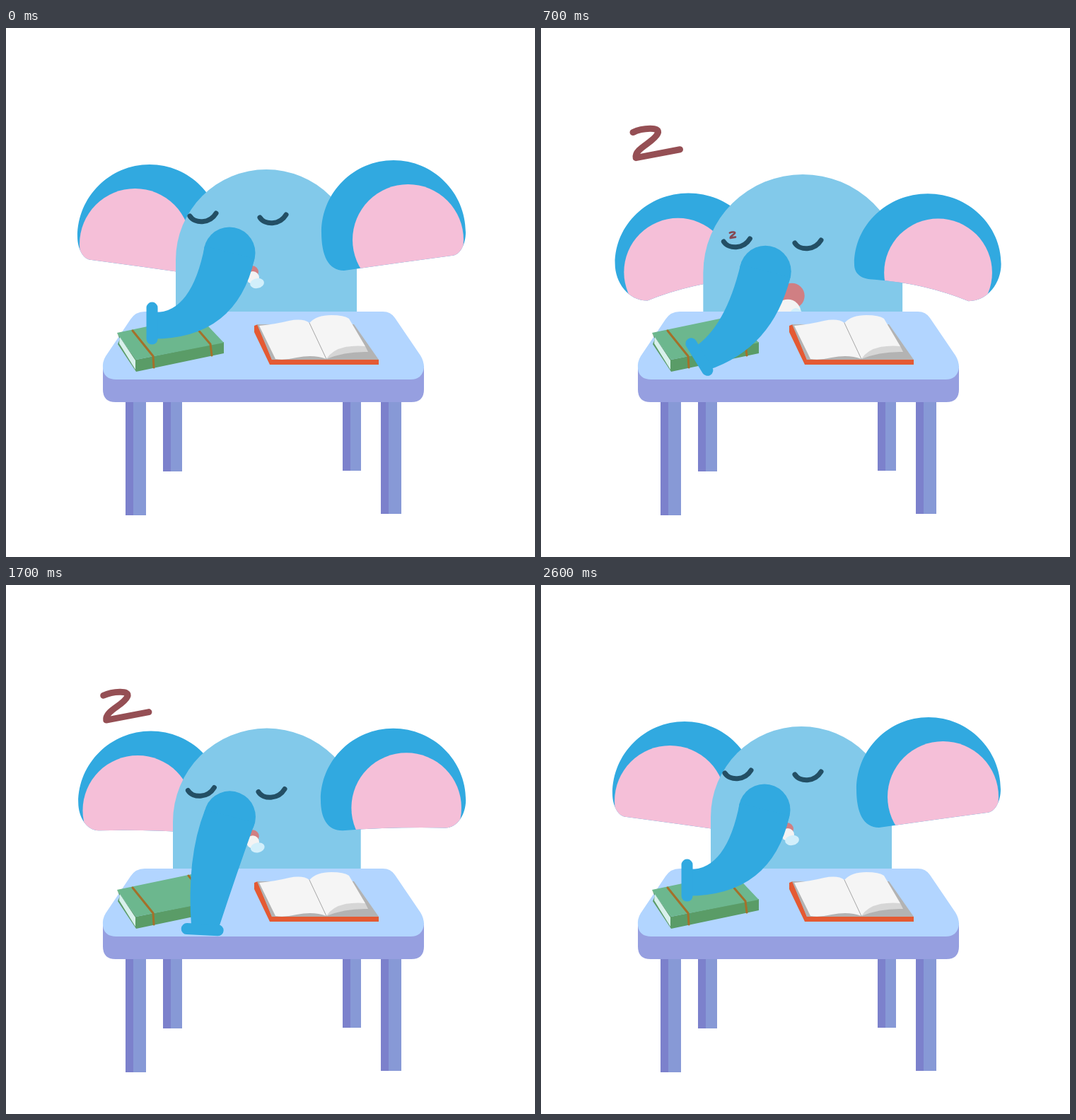
These frames come from a looping animation (748 by 748 pixels, 3 s). An HTML page with a canvas:

```html
<!DOCTYPE html>
<html lang="en">
<head>
<meta charset="utf-8">
<title>Sleepy elephant</title>
<style>
html, body { margin: 0; width: 100%; height: 100%; overflow: hidden; background: #fff; }
canvas { display: block; width: 748px; height: 748px; }
</style>
</head>
<body>
<canvas id="stage" width="748" height="748"></canvas>
<script>
const ctx = document.getElementById('stage').getContext('2d');
const LOOP = 3000, STEP = 50;
const NOD = 1450, ASLEEP = 500, AWAKE = 1050;
const Z_GAP = 1067, Z_BORN = -420, Z_HALT = 33, Z_LEAVE = 500, Z_GONE = 720;
const BLUE = '#31a9e0', SKY = '#82c9ea', PINK = '#f5bfd8';

const mix = (a, b, u) => a + (b - a) * u;
const ramp = (t, a, b) => Math.min(1, Math.max(0, (t - a) / (b - a)));
const hump = (t, a, b) => Math.sin(Math.PI * ramp(t, a, b));

// Goes 0 -> 1 -> 0 over one nod; higher powers leave the upright pose later or return sooner.
function nodding(t, sinkPower, risePower) {
  const u = t < ASLEEP ? ramp(t, 0, ASLEEP) : ramp(t, AWAKE, ASLEEP);
  return (u * u * (3 - 2 * u)) ** (t < ASLEEP ? sinkPower : risePower);
}

function fill(color, d) {
  ctx.fillStyle = color;
  ctx.fill(typeof d === 'string' ? new Path2D(d) : d);
}

function line(color, width, d) {
  ctx.strokeStyle = color;
  ctx.lineWidth = width;
  ctx.stroke(new Path2D(d));
}

function oval(color, x, y, rx, ry = rx, turn = 0) {
  ctx.fillStyle = color;
  ctx.beginPath();
  ctx.ellipse(x, y, rx, ry, turn, 0, Math.PI * 2);
  ctx.fill();
}

function box(color, x, y, w, h) {
  ctx.fillStyle = color;
  ctx.fillRect(x, y, w, h);
}

// Both ears share one shape around their centre, with x pointing outwards.
function drawEar(x, y, out, droop) {
  const rx = 102 + 3 * droop, ry = 102 - 4 * droop, k = 0.552;
  const ex = mix(-70, -78, droop), ey = mix(54, 1, droop);
  const tipX = mix(82, 42, droop), tipY = mix(33, 65, droop);
  const ear = new Path2D();
  ear.moveTo(rx, 0);
  ear.bezierCurveTo(rx, -ry * k, rx * k, -ry, 0, -ry);
  ear.bezierCurveTo(-rx * k, -ry, -rx, -ry * k, -rx, 0);
  ear.bezierCurveTo(-rx, ey * 0.6, mix(-rx, ex, 0.3), ey, ex, ey);
  ear.quadraticCurveTo(mix(7, -11, droop), mix(43, 17, droop), tipX, tipY);
  ear.bezierCurveTo(mix(tipX, rx, 0.6), tipY, rx, tipY * 0.5, rx, 0);
  ctx.save();
  ctx.translate(x, y);
  ctx.scale(out, 1);
  fill(BLUE, ear);
  ctx.clip(ear);
  oval(PINK, mix(20.5, 11, droop), mix(10.5, 13, droop), mix(78.5, 75, droop));
  ctx.restore();
}

function drawHead(dip) {
  const l = mix(240, 214, dip), r = mix(496, 533, dip);
  const top = mix(200, 217, dip), y = mix(328, 372, dip);
  fill(SKY, `M${l} 404V${y}A${(r - l) / 2} ${y - top} 0 0 1 ${r} ${y}V404Z`);
}

function drawEyes(dip, swing) {
  const y = 266 + 88 * dip + 11 * swing;
  for (const [x, dy] of [[260 - 4 * dip, 0], [359, 2]])
    line('#234f65', 7, `M${x - 2 * swing} ${y + dy}c7 11 28 11 37-4`);
}

function drawMouth(dip, open) {
  const x = 348 + 5 * (dip + open), y = 345 + 67 * dip + 7 * open;
  oval('#d07f83', x, y, 9 + 10 * open);
  oval('#f3f3f3', 349, y + 8 + 17 * open, 9 + 10.5 * open);
  oval('#d2effb', x + 7, y + 16 + 16 * open, 10, 7 + 7 * open, -0.2);
}

function drawTable() {
  for (const [x, w, bottom] of [[222, 27, 627], [476, 26, 626], [169, 29, 689], [530, 29, 687]]) {
    box('#8799d6', x, 520, w, bottom - 520);
    box('#7c81cc', x, 520, 11, bottom - 520);
  }
  fill('#969fe0', 'M137 478H591V511Q591 529 573 529H155Q137 529 137 511Z');
  fill('#b2d5ff', 'M196 401H533Q544 401 550 410L586 463Q591 471 591 480Q589 497 572 497' +
    'H156Q139 497 137 482Q136 472 141 464L176 412Q183 401 196 401Z');
}

function drawBooks() {
  fill('#5a9c67', 'M157 431L184 469L308 444V460L184 486L158 447L161 440Z');
  fill('#d8f0ec', 'M161 437L183 470V483L160 446Z');
  fill('#6cb78e', 'M157 431L272 407L308 445L184 469Z');
  line('#a4702a', 3, 'M179 428L208 464L209 480M258 411L289 447L291 463');

  fill('#e45a33', 'M351 421L356 419L376 469H527V476H373L351 430Z');
  fill('#b3b3b3', 'M355 419H492L527 469H376Z');
  fill('#d6d6d6', 'M453 468Q462 451 484 450L508 450L512 458Q480 457 453 468Z');
  fill('#f5f5f5', 'M358 421Q380 419 400 414Q420 410 429 417L453 468Q435 461 411 466Q394 470 381 468Z');
  fill('#f5f5f5', 'M429 417Q439 406 460 406Q478 406 485 411L508 450Q492 449 480 451Q461 455 453 468Z');
  line('#a9a9a9', 1, 'M429 417L453 468');
}

// The trunk curls up to the left at hang 0 and hangs down at hang 1.
function drawTrunk(dip, hang) {
  const x = 316 + 3 * dip, y = 318 + 64 * dip, deg = Math.PI / 180;
  const aim = (47.7 - 34 * hang) * deg, reach = 148 + 16 * hang;
  const tilt = (90 - 115 * hang + 28 * hang * hang) * deg;
  const tipX = x - reach * Math.sin(aim), tipY = y + reach * Math.cos(aim);
  const dx = 22 * Math.cos(tilt), dy = 22 * Math.sin(tilt);
  oval(BLUE, x, y, 36.5);
  fill(BLUE, `M${x - 35} ${y - 10}` +
    `Q${x - 54 - 8 * hang} ${y + 88 - 30 * hang} ${tipX - dx * 0.7} ${tipY - dy * 0.7}` +
    `L${tipX + dx} ${tipY + dy}Q${x + 10} ${y + 122 - 43 * hang} ${x + 35.5} ${y + 8}Z`);
  line(BLUE, 16, `M${tipX - dx} ${tipY - dy}L${tipX + dx} ${tipY + dy}`);
}

// A z flies out of the head, lingers while its tail grows, then drifts off.
function drawZ(age) {
  const out = ramp(age, Z_BORN, Z_HALT), rest = Math.max(0, age - Z_HALT);
  const x = mix(282, 153, out) - 0.115 * Math.max(0, age - Z_LEAVE);
  const y = mix(302, 196, out) - 0.03 * rest - 0.1 * Math.max(0, age - 416);
  const b = mix(5, 23, out) + 0.018 * rest;
  const tail = mix(1.04, 1.8, ramp(age, Z_HALT, Z_LEAVE));
  ctx.save();
  ctx.translate(x, y);
  ctx.globalAlpha = 0.87;
  line('#86353b', Math.min(9, b * 0.38),
    `M0 0C${b * 0.35} ${-b * 0.17} ${b * 1.15} ${-b * 0.25} ${b} ${b * 0.05}` +
    `C${b * 0.85} ${b * 0.4} ${b * 0.05} ${b * 0.65} ${b * 0.12} ${b * 1.03}` +
    `L${b * (0.1 + tail)} ${b * (1.05 - 0.2 * tail)}`);
  ctx.restore();
}

function draw(t) {
  const nod = t < 2 * NOD ? t % NOD : AWAKE;
  const dip = nodding(nod, 2.7, 2.5);
  const droop = nodding(nod, 2.3, 1.4);
  const swing = hump(nod, 0, ASLEEP) ** 2;
  ctx.clearRect(0, 0, 748, 748);
  ctx.lineCap = ctx.lineJoin = 'round';
  drawEar(mix(203, 212, droop), mix(295, 358, droop), -1, droop);
  drawHead(dip);
  drawEar(mix(548, 546, droop), mix(289, 363, droop), 1, droop);
  drawEyes(dip, swing);
  drawMouth(dip, hump(nod, ASLEEP, AWAKE));
  drawTable();
  drawBooks();
  drawTrunk(dip, 0.72 * dip + 0.89 * swing);
  if (t < STEP || t >= 2600) return;
  for (let age = t; age >= Z_BORN; age -= Z_GAP)
    if (age <= Z_GONE) drawZ(age);
}

const start = performance.now();
function tick() {
  const t = (performance.now() - start) % LOOP;
  draw(Math.floor(t / STEP) * STEP);
  requestAnimationFrame(tick);
}
tick();
</script>
</body>
</html>
```
